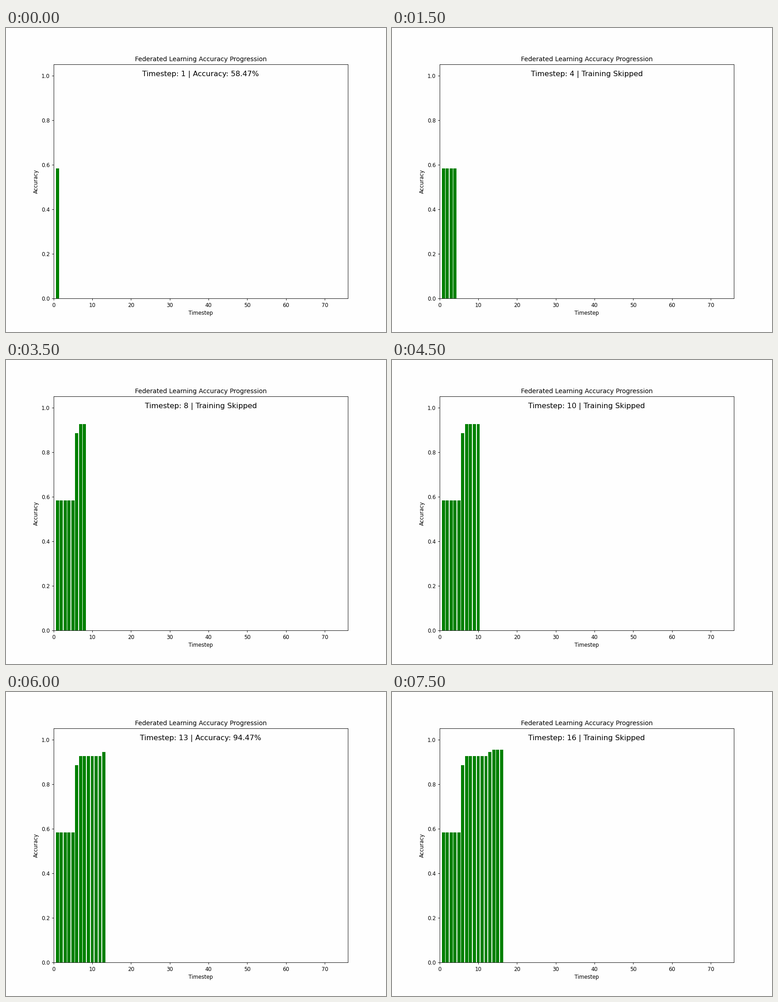
Recreate the animation shown at these times as a matplotlib script. Size 837 by 669 pixels, loop 8000 ms.

```python
import matplotlib.pyplot as plt
from matplotlib.animation import FuncAnimation

WIDTH, HEIGHT = 837, 669
DPI = WIDTH / 10
STEPS = 16
PAPER = "#fefefe"

# Accuracy after each training round; the other timesteps skip training.
TRAINED = {1: 0.5847, 6: 0.8862, 7: 0.9258, 13: 0.9447, 14: 0.9545}


def accuracy(step):
    return TRAINED[max(s for s in TRAINED if s <= step)]


def status(step):
    if step in TRAINED:
        return f"Timestep: {step} | Accuracy: {TRAINED[step] * 100:.2f}%"
    return f"Timestep: {step} | Training Skipped"


plt.rcParams["font.family"] = "DejaVu Sans"
# The tiny margin keeps the pixel size from being truncated.
fig, ax = plt.subplots(
    figsize=((WIDTH + 1e-3) / DPI, (HEIGHT + 1e-3) / DPI), dpi=DPI, facecolor=PAPER
)
ax.set_facecolor(PAPER)
ax.set_xlim(0, 76)
ax.set_ylim(0, 1.05)
ax.set_title("Federated Learning Accuracy Progression")
ax.set_xlabel("Timestep")
ax.set_ylabel("Accuracy")

steps = range(1, STEPS + 1)
bars = ax.bar(steps, [accuracy(s) for s in steps], width=0.8, color="green")
label = ax.text(0.5, 0.95, "", transform=ax.transAxes, ha="center", fontsize=14)


def update(frame):
    for i, bar in enumerate(bars):
        bar.set_visible(i <= frame)
    label.set_text(status(frame + 1))
    return [*bars, label]


anim = FuncAnimation(
    fig, update, frames=STEPS, init_func=lambda: update(0),
    interval=500, repeat=True, repeat_delay=0, blit=False,
)

plt.show()
```
